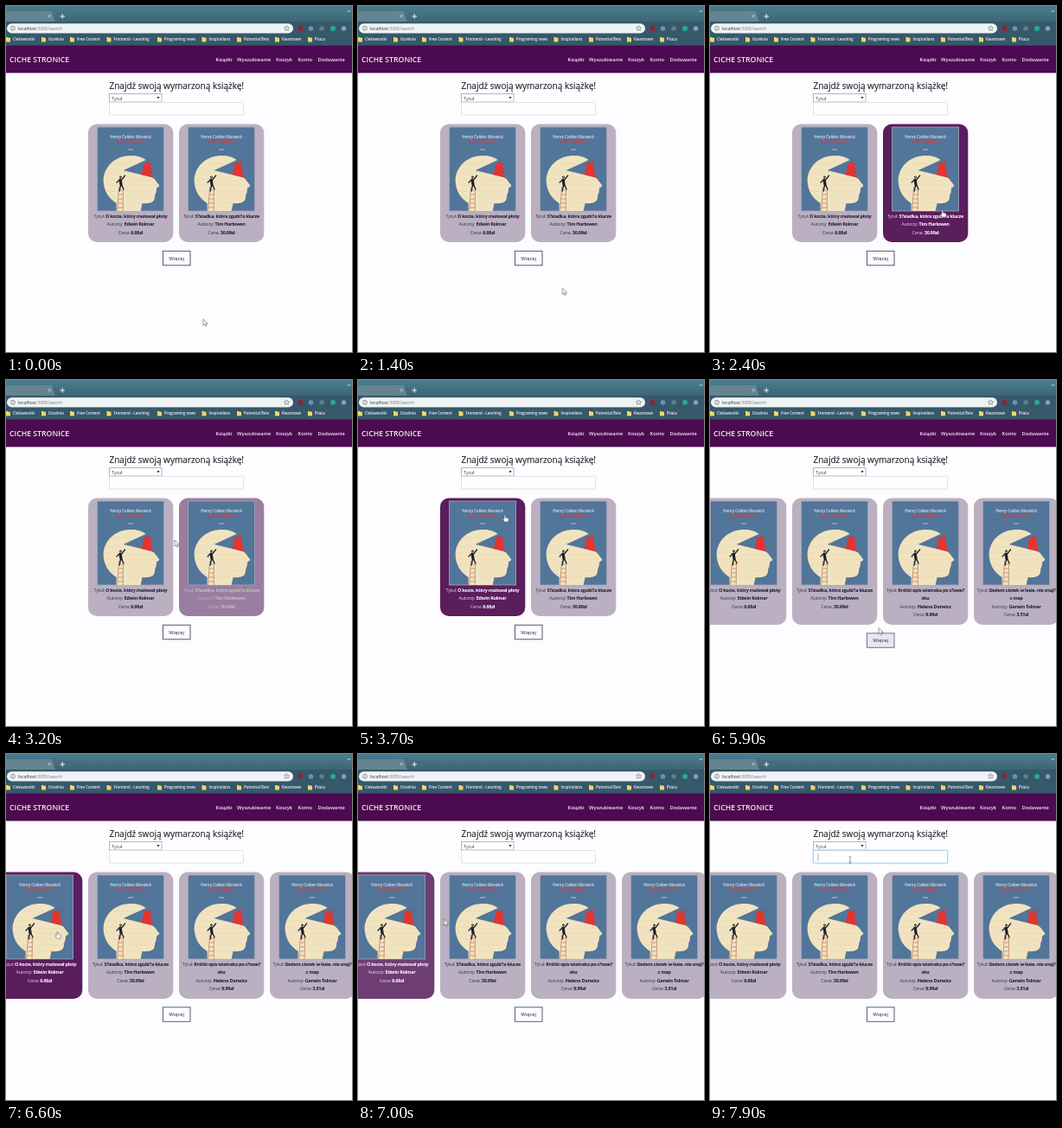
An HTML page for the animation above (8000 ms loop, 400 by 400 pixels).

```html
<!DOCTYPE html>
<html lang="pl">
<head>
<meta charset="utf-8">
<title>Wyszukiwarka książek</title>
<style>
  html, body { margin: 0; width: 100%; height: 100%; overflow: hidden; background: #fdfcfe; }
  svg { display: block; width: 100vw; height: 100vh; font-family: "Open Sans", "Noto Sans", sans-serif; }
  .semi { font-weight: 600; }
  .bold { font-weight: 700; fill-opacity: 1; }
  .mid { text-anchor: middle; }

  /* Books: colour drives the card, fill drives its text */
  .book { color: #bab0c2; fill: #1f1a2a; }
  .card { fill: currentColor; height: 146.5px; animation: grow 8s step-end infinite; }
  .row { animation: slide 8s step-end infinite; }
  .late { animation: late 8s step-end infinite; }
  .hover0 { animation: hover0 8s linear infinite; }
  .hover1 { animation: hover1 8s linear infinite; }
  .info { font-size: 5.5px; letter-spacing: -.26px; fill-opacity: .8; }

  @keyframes grow { 0% { height: 136.5px } 70%, 100% { height: 146.5px } }
  @keyframes slide { 0% { transform: translateX(105px) } 70%, 100% { transform: none } }
  @keyframes late { 0% { opacity: 0 } 70%, 100% { opacity: 1 } }
  /* The text stays white a little longer than the card stays dark */
  @keyframes hover0 {
    0%, 40.6%, 56.3%, 80%, 92%, 100% { color: #bab0c2; fill: #1f1a2a }
    43.1%, 51.9%, 82.5%, 86.25% { color: #5a1d5e }
    43.1%, 54%, 82.5%, 89% { fill: #fff }
  }
  @keyframes hover1 {
    0%, 22.5%, 41.3%, 53.1%, 61.3%, 87.8%, 95%, 100% { color: #bab0c2; fill: #1f1a2a }
    25%, 37.5%, 55%, 57.5% { color: #5a1d5e }
    25%, 39.5%, 55%, 59.5% { fill: #fff }
    90%, 91.3% { color: #7a4a7c; fill: #e4dfe6 }
  }

  .more { animation: drop 8s step-end infinite; }
  .more rect { animation: press 8s step-end infinite; }
  @keyframes drop { 0% { transform: none } 70%, 100% { transform: translateY(9.5px) } }
  @keyframes press {
    0% { fill: #fdfcfe; stroke: #5a5470 }
    63% { fill: #eeeaf2; stroke: #5a5470 }
    69% { fill: #eae6f0; stroke: #6a6f9c }
    78%, 100% { fill: #fdfcfe; stroke: #5c5c82 }
  }

  .focus { animation: focus 8s step-end infinite; }
  @keyframes focus { 0% { opacity: 0 } 95%, 100% { opacity: 1 } }

  /* Mouse pointer: one path, three shapes */
  .mouse { animation: move 8s ease-in-out infinite; }
  @keyframes move {
    0%, 13.75% { transform: translate(228px, 362px) }
    22.5% { transform: translate(250px, 268px) }
    25% { transform: translate(262px, 230px) }
    30%, 33% { transform: translate(268px, 236px) }
    36% { transform: translate(250px, 222px) }
    40% { transform: translate(195px, 185px) }
    42.5% { transform: translate(165px, 163px) }
    46.25%, 50% { transform: translate(169px, 156px) }
    55% { transform: translate(222px, 225px) }
    58.75% { transform: translate(200px, 272px) }
    63.75%, 77.5% { transform: translate(195px, 286.5px) }
    81.25% { transform: translate(60px, 210px) }
    84.4% { transform: translate(55px, 196px) }
    87.5% { transform: translate(99.500px, 191px) }
    91.25% { transform: translate(150px, 140px) }
    94%, 100% { transform: translate(162px, 118.500px) }
  }
  .arrow { animation: arrow 8s step-end infinite; }
  .hand { animation: hand 8s step-end infinite; }
  .beam { animation: beam 8s step-end infinite; }
  @keyframes arrow {
    0%, 38.5%, 57.5%, 70%, 86.25%, 91.3% { opacity: 1 }
    22.5%, 40.5%, 62.5%, 80%, 88%, 92.5%, 100% { opacity: 0 }
  }
  @keyframes hand {
    0%, 38.5%, 57.5%, 70%, 86.25%, 91.3%, 100% { opacity: 0 }
    22.5%, 40.5%, 62.5%, 80%, 88% { opacity: 1 }
  }
  @keyframes beam { 0% { opacity: 0 } 92.5%, 100% { opacity: 1 } }
</style>
</head>
<body>
<svg viewBox="0 0 400 400">
  <defs>
    <linearGradient id="bar" x2="0" y2="1">
      <stop stop-color="#4a7c8e"/><stop offset="1" stop-color="#3c6676"/>
    </linearGradient>
    <g id="cover">
      <rect width="77" height="97" fill="#52759a" stroke="#a9a3b3" stroke-width=".8"/>
      <text class="mid semi" x="38.5" y="13.4" font-size="4.400" fill="#dfe6ee">Henry Colden Marwick</text>
      <text class="mid semi" x="38.5" y="19.4" font-size="4.700" fill="#cf4048">DALEKI BRZEG</text>
      <path d="M35.5 26h6" stroke="#cfd9e4" stroke-width=".8"/>
      <path d="M7 61C8 46 19 34.500 36 33C45 32.500 51 34 56 38L30 50L63 58L66 60L72 68L68.500 70.500L68 75L66.500 79C67 87 61 89 52 88L50 97H22V88C12 82 7 72 7 61Z" fill="#f1e3bf"/>
      <path d="M20 42H44M10 53H26M8 60H24M8 67H23M34 62H65M34 67H69M34 74H66M34 81H65M10 74H22M15 81H22M33 88H50" stroke="#e6d6ac" stroke-width=".6"/>
      <path d="M54 42L61 40L64 58.200L51 55Z" fill="#e2352f"/>
      <path d="M25 69L23 97M30 69L29.500 97M24.800 73H30M24.600 78H30M24.300 83H30M24 88H30M23.600 93H30" stroke="#b9785f" stroke-width=".7" fill="none"/>
      <g stroke="#1c2030" stroke-linecap="round" fill="none">
        <path d="M26.500 61L27.500 67" stroke-width="3.200"/>
        <path d="M28 61L32 56M25.500 61L22.500 64M27 67L25.500 74M28 67L30.500 72" stroke-width="1.300"/>
        <circle cx="26.800" cy="57.800" r=".9"/>
      </g>
    </g>
  </defs>

  <rect width="400" height="400" fill="#fdfcfe"/>

  <!-- Browser window -->
  <rect width="400" height="18" fill="url(#bar)"/>
  <path d="M0 6H53L57 18H0Z" fill="#64858f"/>
  <path d="M48.500 10l3.500 3.500m0-3.500l-3.500 3.500" stroke="#dce6e9" stroke-width=".7"/>
  <path d="M62.500 12h5.500M65.250 9.250v5.500" stroke="#f2f6f7"/>
  <path d="M394.500 6h4" stroke="#e4ecee" stroke-width=".8"/>
  <rect y="18" width="400" height="28" fill="#35596a"/>
  <rect x="1" y="20.300" width="331" height="11.200" rx="5.600" fill="#f0f3f5"/>
  <circle cx="8" cy="25.800" r="2.500" fill="none" stroke="#59636a" stroke-width=".6"/>
  <path d="M8 25.300v2M8 24v.7" stroke="#59636a" stroke-width=".6"/>
  <text x="14" y="27.700" font-size="5" fill="#252a2e">localhost<tspan fill="#737b81">:3000/search</tspan></text>
  <path d="M324.500 22.800l.9 2 2.100.2-1.600 1.400.5 2.100-1.900-1.100-1.900 1.100.5-2.100-1.600-1.400 2.100-.2z" fill="none" stroke="#59636a" stroke-width=".6"/>
  <circle cx="340.500" cy="26" r="3" fill="#8c2534"/>
  <circle cx="352.500" cy="26" r="2.800" fill="#6f94b8"/>
  <circle cx="365" cy="26" r="2.800" fill="#5d7f8a"/>
  <circle cx="378" cy="26" r="3" fill="#2fa58e"/>
  <circle cx="390.500" cy="26" r="2.700" fill="#8aa1aa"/>
  <g id="marks" class="semi" font-size="4.350" fill="#f0f4f5"></g>

  <!-- Site header -->
  <rect y="45.600" width="400" height="31.800" fill="#4c0a50"/>
  <text class="semi" x="4" y="65.300" font-size="8.700" fill="#f3ebf4">CICHE STRONICE</text>
  <g id="nav" class="semi" font-size="5.750" fill="#f6eff7"></g>

  <!-- Search form -->
  <text x="119.500" y="96.300" font-size="10" fill="#211d28" stroke="#211d28" stroke-width=".12">Znajdź swoją wymarzoną książkę!</text>
  <rect x="119.500" y="101.500" width="60.500" height="9.500" fill="#fff" stroke="#a5a1b4" stroke-width=".8"/>
  <text x="122" y="108.500" font-size="5.500" fill="#45404c">Tytuł</text>
  <path d="M174.300 105h3.400l-1.700 2.600z" fill="#35313c"/>
  <rect x="119.500" y="111.500" width="155" height="14.500" rx="1" fill="#fefeff" stroke="#e0dce8" stroke-width=".9"/>
  <g class="focus">
    <rect x="119.500" y="111.500" width="155" height="14.500" rx="1.500" fill="none" stroke="#d8eafa" stroke-width="2.400"/>
    <rect x="119.500" y="111.500" width="155" height="14.500" rx="1" fill="#fff" stroke="#a6cdee" stroke-width=".9"/>
    <path d="M125 115v8.500" stroke="#7b7b88" stroke-width=".7"/>
  </g>

  <g id="books" class="row"></g>

  <g class="more">
    <rect x="181.500" y="283.300" width="31.500" height="16.500"/>
    <text class="mid" x="197.200" y="293.800" font-size="5.900" fill="#2c2838">Więcej</text>
  </g>

  <g class="mouse" stroke="#55555f" stroke-width=".6" stroke-linejoin="round">
    <path class="arrow" d="M0 0V7.200L1.700 5.700L2.800 8.200L4 7.700L2.900 5.200H5.200Z" fill="#fff"/>
    <path class="hand" d="M0 .6Q.8-.6 1.500.6V3L4.600 3.700Q5.400 4 5.200 5L4.600 8H.7L-1.700 5Q-1.400 4 0 4.900Z" fill="#fff"/>
    <path class="beam" d="M-1.500 0H1.500M0 0V7M-1.500 7H1.500" fill="none"/>
  </g>
</svg>

<script>
  const fill = (id, items, draw) =>
    document.getElementById(id).innerHTML = items.map(draw).join("");

  const marks = [
    [0, "Ciekawostki"], [41, "Uczelnia"], [74, "Free Content"],
    [116.5, "Frontend - Learning"], [175, "Programing news"], [226.5, "Inspirations"],
    [267, "Potential Bets"], [311, "Kwantowe"], [349, "Praca"]
  ];
  fill("marks", marks, ([x, name]) =>
    `<path d="M${x} 36h2l.7.8h2.300v4.600h-5z" fill="#f5d565"/><text x="${x + 8}" y="40.300">${name}</text>`);

  const links = [[242.5, "Książki"], [267, "Wyszukiwanie"], [312, "Koszyk"], [337.5, "Konto"], [360.5, "Dodawanie"]];
  fill("nav", links, ([x, name]) => `<text x="${x}" y="64.200">${name}</text>`);

  const books = [
    { title: ["O kocie, który malował płoty"], author: "Edwin Kolmar", price: "6.66zł", hover: "hover0" },
    { title: ["S?siadka, która zgubi?a klucze"], author: "Tim Harlowen", price: "30.99zł", hover: "hover1" },
    { title: ["Krótki opis wiatraka po s?owe?", "sku"], author: "Helena Dorwicz", price: "9.99zł", hover: "late" },
    { title: ["Siedem ciotek w lesie, nie znaj?", "c map"], author: "Gerwin Tolmar", price: "3.51zł", hover: "late" }
  ];
  const bold = text => `<tspan class="bold">${text}</tspan>`;
  fill("books", books, ({ title, author, price, hover }, i) => {
    const [first, ...rest] = title;
    const lines = ["Tytuł: " + bold(first), ...rest.map(bold),
      "Autorzy: " + bold(author), "Cena: " + bold(price)];
    const text = lines.map((line, n) =>
      `<text class="mid info" x="49" y="${244.5 + n * 9.6}">${line}</text>`).join("");
    return `<g transform="translate(${i * 105 - 10})"><g class="book ${hover}">
      <rect class="card" y="136.500" width="98.300" rx="10"/>
      <use href="#cover" x="10.600" y="140"/>${text}</g></g>`;
  });
</script>
</body>
</html>
```
